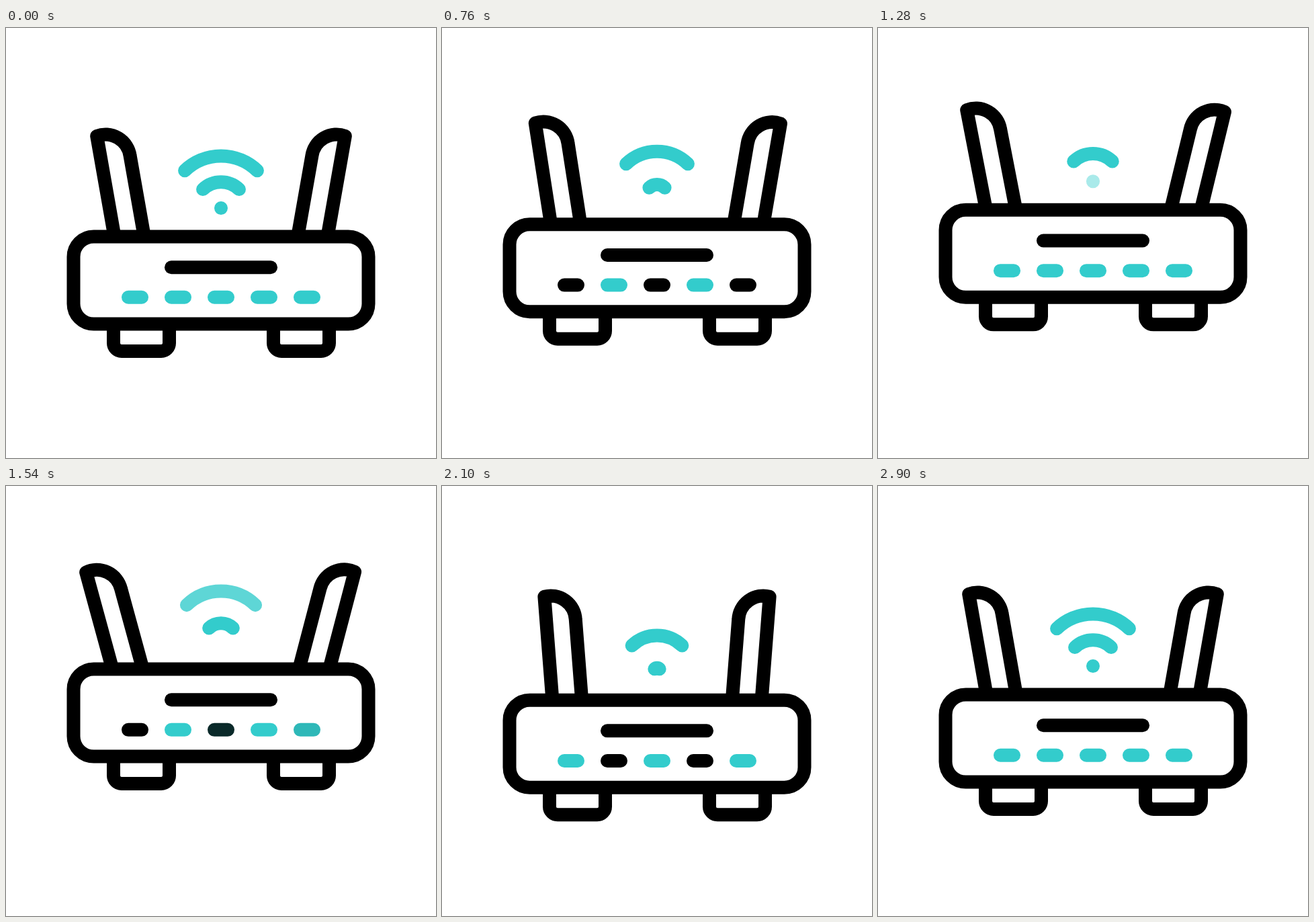
An HTML page for the animation above (3200 ms loop, 640 by 640 pixels).

```html
<!DOCTYPE html>
<html lang="en">
<head>
<meta charset="utf-8">
<title>Router</title>
<style>
  html, body { margin: 0; width: 100%; height: 100%; overflow: hidden; background: #fff; }
  svg { display: block; width: 100%; height: 100%; }
  .line { fill: none; stroke: #000; stroke-width: 20; stroke-linecap: round; stroke-linejoin: round; }
  .teal { stroke: #33cccc; }
  .body { fill: #fff; }
</style>
</head>
<body>
<svg viewBox="0 0 640 640">
  <defs>
    <path id="mast" class="line" d="M163.2 320 L135.2 160.8 A37 37 0 0 1 184.6 190 L207.5 320"/>
    <path id="foot" class="line" d="M160 440 V469 A12 12 0 0 0 172 481 H231 A12 12 0 0 0 243 469 V440"/>
  </defs>
  <g id="router">
    <g id="left"><use href="#mast"/></g>
    <g transform="translate(640 0) scale(-1 1)"><g id="right"><use href="#mast"/></g></g>
    <use href="#foot"/>
    <use href="#foot" x="238"/>
    <rect class="line body" x="100.5" y="310.5" width="439" height="130" rx="30"/>
    <path class="line" d="M246 356.2 H394"/>
    <g id="leds"></g>
    <g id="waves"></g>
  </g>
</svg>
<script>
const LOOP = 3200, START = 180, STEP = 360, STEPS = 6, END = START + STEP * STEPS;
const byId = id => document.getElementById(id);
const clamp = (v, lo = 0, hi = 1) => Math.min(hi, Math.max(lo, v));

// [time, value] keys
const lift = [[170, 0], [390, 24.5], [480, 11.3], [700, -14.5], [1040, -30.5], [1260, -39.5],
  [1360, -40], [1540, -38], [1780, -29.8], [2100, 8], [2180, 24.5], [2340, -14], [2420, -7],
  [2560, 0], [2880, 0]];
const sway = (a, b) => [[170, 0], [420, -8], [480, -7], [700, -1], [1040, a], [1540, b],
  [1780, 2], [2100, -5.5], [2180, -7], [2340, 4.5], [2420, 3], [2580, -1], [2890, 0]];
const swayLeft = sway(-2.9, 5.3), swayRight = sway(1.9, 4.7);

const slope = (k, i) => (k[i + 1][1] - k[i][1]) / (k[i + 1][0] - k[i][0]);

// Tangent that never overshoots: flat at turning points
function tangent(k, i) {
  if (i === 0 || i === k.length - 1) return 0;
  const a = slope(k, i - 1), b = slope(k, i);
  return a * b <= 0 ? 0 : 2 * a * b / (a + b);
}

function sample(k, t) {
  const last = k.length - 1;
  if (t <= k[0][0]) return k[0][1];
  if (t >= k[last][0]) return k[last][1];
  let i = 0;
  while (t > k[i + 1][0]) i++;
  const d = k[i + 1][0] - k[i][0], x = (t - k[i][0]) / d, y = 1 - x;
  return k[i][1] * (1 + 2 * x) * y * y + k[i + 1][1] * x * x * (3 - 2 * x)
    + d * (tangent(k, i) * x * y * y - tangent(k, i + 1) * x * x * y);
}

function addPath(parent, d) {
  const p = document.createElementNS('http://www.w3.org/2000/svg', 'path');
  p.setAttribute('class', 'line teal');
  p.setAttribute('d', d);
  return parent.appendChild(p);
}
const leds = Array.from({ length: 5 }, (_, i) => addPath(byId('leds'), `M${182 + 64 * i} 400.8 h20`));
const waves = [0, 1, 2].map(() => addPath(byId('waves'), ''));

// Size 0 is the dot, 1 the inner arc, 2 the outer arc
function arc(size) {
  const r = 38.8 * size, half = Math.max(r * Math.sin(0.768), 0.01);
  const y = 268 - r * Math.cos(0.768);
  return `M${320 - half} ${y} A${r || 1} ${r || 1} 0 0 1 ${320 + half} ${y}`;
}

function drawWaves(t) {
  const u = clamp(t, START, END) - START, newest = Math.floor(u / STEP);
  for (let k = newest; k > newest - 3; k--) {
    const age = u - k * STEP, wave = waves[(k + 3) % 3];
    const size = age < STEP ? 1 - Math.cos(Math.PI * age / (2 * STEP))
      : Math.min(2, 1 + (age - STEP) / 314);
    let alpha = 1;
    if (k === -2) alpha = 1 - (t - START) / 100;
    else if (k < STEPS - 2) alpha = (2 * STEP - age) / 100;
    if (k > 0) alpha = Math.min(alpha, (t - START - k * STEP) / 50);
    wave.setAttribute('d', arc(size));
    wave.setAttribute('opacity', clamp(alpha));
  }
}

function drawLeds(t) {
  const active = t > START && t < END, u = (t - START) % STEP;
  leds.forEach((led, i) => {
    const odd = i % 2 === 0;
    const on = odd ? 170 : 50, off = odd ? 290 - 7 * i + (i ? 1 : 0) : 160;
    const dark = active ? clamp((u - on) / 20) * clamp((off + 20 - u) / 20) : 0;
    const c = Math.round(204 * (1 - dark));
    led.style.stroke = `rgb(${Math.round(c / 4)},${c},${c})`;
  });
}

function draw(t) {
  byId('router').setAttribute('transform', `translate(0 ${sample(lift, t)})`);
  byId('left').setAttribute('transform', `rotate(${-sample(swayLeft, t)} 188 337)`);
  byId('right').setAttribute('transform', `rotate(${-sample(swayRight, t)} 188 337)`);
  drawWaves(t);
  drawLeds(t);
}

const begin = performance.now();
function tick(now) {
  draw(Math.max(0, now - begin) % LOOP);
  requestAnimationFrame(tick);
}
draw(0);
requestAnimationFrame(tick);
</script>
</body>
</html>
```
